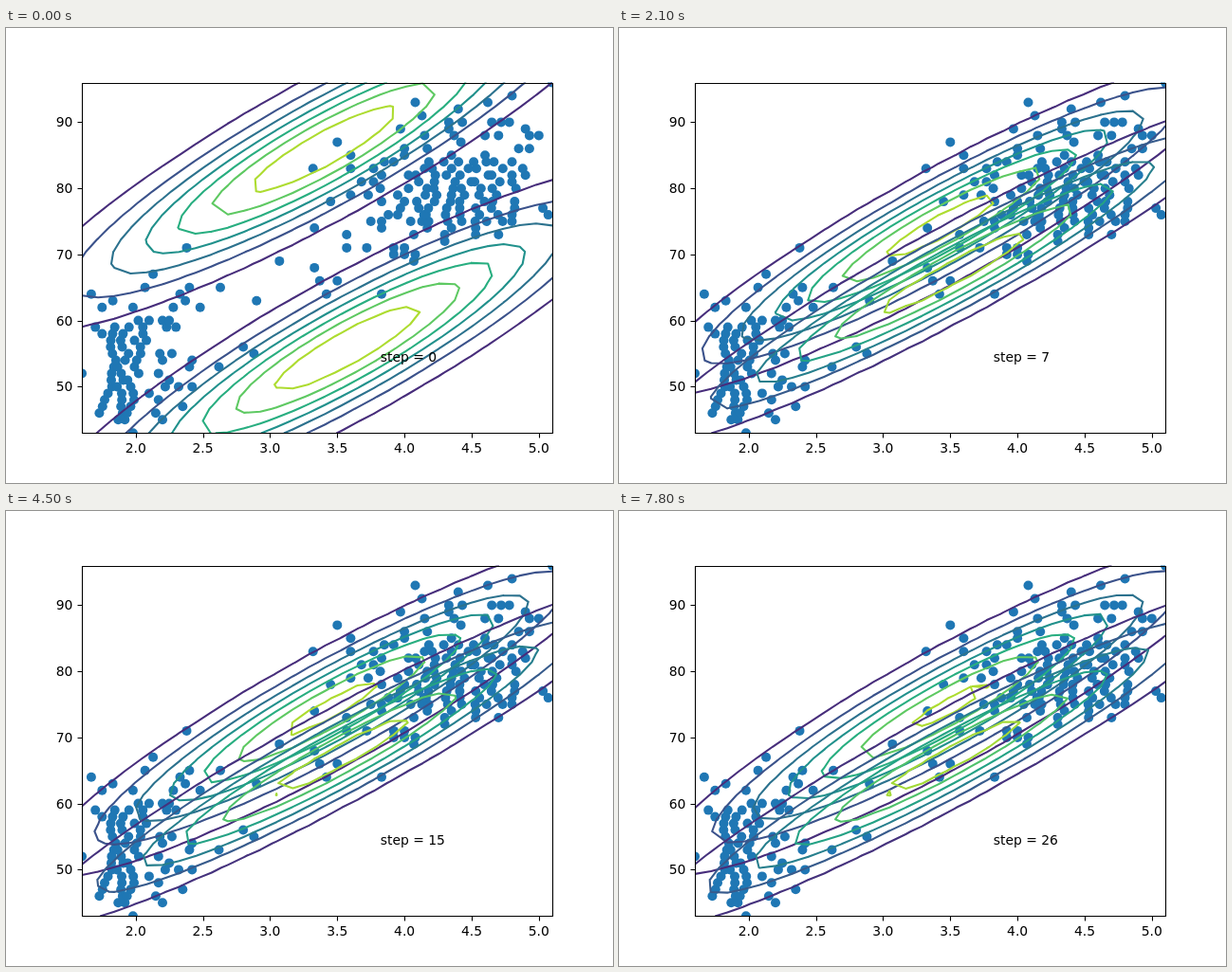
Recreate the animation shown at these times as an HTML page. Size 640x480 px, loop 8000 ms.

```html
<!DOCTYPE html>
<html lang="en">
<head>
<meta charset="utf-8">
<title>Two-component mixture fit</title>
<style>
html, body { margin: 0; width: 100%; height: 100%; overflow: hidden; background: #fff; }
svg { display: block; width: 640px; height: 480px; }
text { font: 13.89px "DejaVu Sans", sans-serif; }
</style>
</head>
<body>
<svg viewBox="0 0 640 480">
  <clipPath id="box"><rect x="80" y="57.6" width="496" height="369.6"/></clipPath>
  <g clip-path="url(#box)">
    <g id="dots" fill="#1f77b4"></g>
    <g id="lines" fill="none" stroke-width="2.08" stroke-linecap="round"></g>
  </g>
  <g id="axes"></g>
  <text id="label" x="394.8" y="352.3"></text>
</svg>
<script>
const $ = id => document.getElementById(id);
const LEFT = 80, TOP = 57.6, W = 496, H = 369.6, N = 30;
const ux = W / 3.5, uy = H / 53;
const px = x => LEFT + (x - 1.6) * ux;
const py = y => TOP + (96 - y) * uy;

// Outlying points: 100 * x for each integer y from 43 up
const rows = [
  [198], [], [187, 192, 220], [215], [235], [217], [210], [222, 232, 242],
  [225], [160, 217], [240, 262], [220, 242], [218, 227, 288], [280], [208], [175],
  [170, 223, 230], [202, 210, 220, 225], [], [175, 198, 228, 248], [183, 237, 290],
  [167, 233, 342, 383], [207, 240, 263], [337, 350], [213], [333], [307, 407],
  [392, 400, 408], [238, 357, 372, 392, 400], [430], [357, 407, 430, 453, 470],
  [333, 383, 417, 435, 453], [375, 383, 413, 473, 480], [388, 395, 480, 507],
  [397, 482, 503], [345, 383, 400, 482], [360, 373, 395], [382, 403, 483],
  [368, 377, 480], [383, 403, 480, 490], [332, 360, 377, 488], [385, 392, 480],
  [360, 400, 435, 460], [400, 417, 485, 493], [350, 442],
  [415, 437, 460, 470, 493, 500], [397, 433, 490], [433, 443, 465, 472, 478],
  [413], [440], [408, 462], [480], [], [510]
];

let seed = 7;
const rnd = () => (seed = seed * 16807 % 2147483647) / 2147483647;

const dots = rows.flatMap((xs, i) => xs.map(x => [x / 100, 43 + i]));
// Dense cores of both clusters: jittered columns on integer rows
function fillCore(y0, y1, n, x0, gap, lean) {
  for (let y = y0; y <= y1; y++)
    for (let k = 0; k < n; k++)
      dots.push([x0 + gap * (k + rnd()) + lean * (y - y0), y]);
}
fillCore(46, 59, 3, 1.73, 0.09, 0.005);
fillCore(75, 84, 6, 4.04, 0.11, 0.005);
$('dots').innerHTML = dots.map(([x, y]) =>
  `<circle cx="${px(x).toFixed(1)}" cy="${py(y).toFixed(1)}" r="5"/>`).join('');

const snap = v => Math.round(v) + 0.5;
let axes = '', ticks = '';
for (let x = 2; x <= 5; x += 0.5) {
  ticks += `M${snap(px(x))} 427.5v5`;
  axes += `<text x="${px(x)}" y="447.8" text-anchor="middle">${x.toFixed(1)}</text>`;
}
for (let y = 50; y <= 90; y += 10) {
  ticks += `M80.5 ${snap(py(y))}h-5`;
  axes += `<text x="70.3" y="${py(y) + 5}" text-anchor="end">${y}</text>`;
}
$('axes').innerHTML = axes +
  `<path d="M80.5 58.5h496v369h-496z${ticks}" fill="none" stroke="#000" stroke-width="1.1"/>`;

// step, slope, then per component: mean x, mean y, spread along x, spread about the slope
const keys = [
  [0, -0.528, 335, 127.7, 161.7, 41.2, 360, 337.5, 161.7, 41.2],
  [1, -0.537, 337, 205.2, 155, 27.5, 358, 260, 164, 25.3],
  [4, -0.538, 340, 207.6, 154.5, 31.6, 358, 256.3, 165, 27.05],
  [7, -0.533, 341, 208.4, 156, 33.2, 354, 257.1, 166, 28.06],
  [11, -0.533, 342, 208, 155, 34.06, 353, 257.7, 166.5, 28.3],
  [15, -0.532, 343.5, 207.6, 155, 34.3, 352, 258.4, 166.3, 28.45],
  [19, -0.532, 344.8, 207.2, 154.8, 34.56, 351.5, 259, 166, 28.55],
  [26, -0.531, 347, 206.4, 154.7, 34.8, 350, 260, 166, 28.6]
];
function params(step) {
  const i = Math.max(1, keys.findIndex(k => k[0] >= step));
  const a = keys[i - 1], b = keys[i], f = (step - a[0]) / (b[0] - a[0]);
  return a.map((v, j) => v + (b[j] - v) * f);
}

const viridis = ['440154', '472d7b', '3b528b', '2c728e', '21918c', '28ae80', '5ec962', 'addc30', 'fde725']
  .map(h => [0, 2, 4].map(i => parseInt(h.slice(i, i + 2), 16)));
function color(f) {
  const i = Math.min(7, Math.floor(f * 8)), t = f * 8 - i;
  return `rgb(${viridis[i].map((v, j) => Math.round(v + (viridis[i + 1][j] - v) * t))})`;
}

const gx = i => LEFT + W * i / (N - 1);
const gy = j => TOP + H * j / (N - 1);

// Marching squares over the N x N grid
function isoline(z, level) {
  let d = '';
  for (let j = 0; j < N - 1; j++) for (let i = 0; i < N - 1; i++) {
    const c = [[i, j], [i + 1, j], [i + 1, j + 1], [i, j + 1]];
    const v = c.map(([a, b]) => z[b][a]);
    const hits = [];
    for (let k = 0; k < 4; k++) {
      const m = (k + 1) % 4;
      if ((v[k] > level) === (v[m] > level)) continue;
      const t = (level - v[k]) / (v[m] - v[k]);
      const x = gx(c[k][0] + (c[m][0] - c[k][0]) * t);
      const y = gy(c[k][1] + (c[m][1] - c[k][1]) * t);
      hits.push(x.toFixed(2) + ' ' + y.toFixed(2));
    }
    if (hits.length === 4 && v[0] + v[1] + v[2] + v[3] > 4 * level) hits.unshift(hits.pop());
    for (let k = 0; k < hits.length; k += 2) d += `M${hits[k]}L${hits[k + 1]}`;
  }
  return d;
}

function contours(slope, mx, my, sx, sy) {
  const peak = ux * uy / (2 * Math.PI * sx * sy);
  const z = Array.from({ length: N }, (_, j) => Array.from({ length: N }, (_, i) => {
    const dx = gx(i) - mx, u = dx / sx, v = (gy(j) - my - slope * dx) / sy;
    return peak * Math.exp(-(u * u + v * v) / 2);
  }));
  const max = Math.max(...z.flat());
  const gap = [0.003, 0.004, 0.005, 0.006].find(s => s * 8 >= max);
  const n = Math.ceil(max / gap);
  let out = '';
  for (let k = 1; k < n; k++)
    out += `<path d="${isoline(z, k * gap)}" stroke="${color(k / n)}"/>`;
  return out;
}

let shown = -1;
function draw(now) {
  const step = Math.floor(now % 8000 / 300);
  if (step !== shown) {
    shown = step;
    const [, slope, ...p] = params(step);
    $('lines').innerHTML = contours(slope, ...p.slice(0, 4)) + contours(slope, ...p.slice(4));
    $('label').textContent = 'step = ' + step;
  }
  requestAnimationFrame(draw);
}
draw(performance.now());
</script>
</body>
</html>
```
